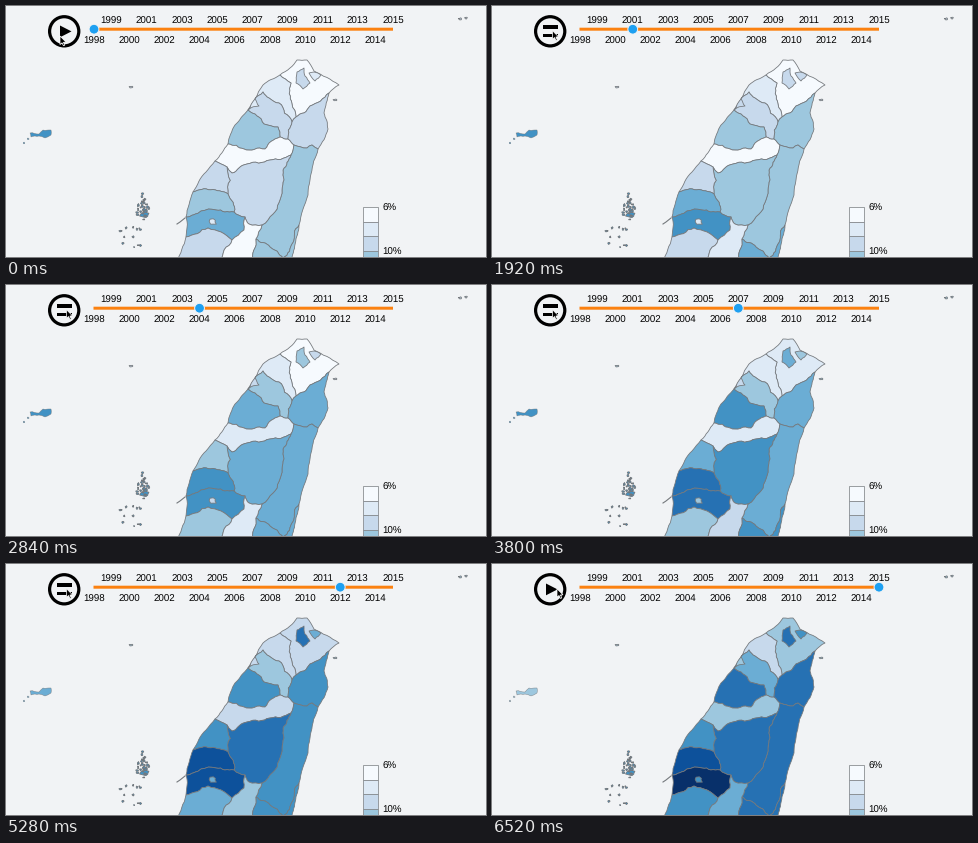
A matplotlib script for the animation above (6.56 s loop, 480 px wide and 251 px high).

```python
import numpy as np
import matplotlib.pyplot as plt
from matplotlib.animation import FuncAnimation
from matplotlib.patches import Circle, Polygon, Rectangle

W, H, DPI = 480, 251, 72          # at 72 dpi one point is one pixel
STEP, LOOP = 40, 6560
START, TICK = 920, 300            # playback start and time per year, ms
FIRST, LAST = 1998, 2015
BLUES = ["#f6fafe", "#deeaf6", "#c7d9ec", "#9dc7de", "#6badd4",
         "#4292c4", "#2671b3", "#0d519b", "#08306a"]
BG, EDGE = "#f1f3f5", "#74787c"

plt.rcParams["text.hinting"] = "none"
rng = np.random.default_rng(7)

fig = plt.figure(figsize=(W / DPI, H / DPI), dpi=DPI, facecolor=BG)
ax = fig.add_axes([0, 0, 1, 1])
ax.set(xlim=(0, W), ylim=(H, 0))
ax.axis("off")


def rough(points, amount=0.12):
    """Turn a polyline into a jagged border by midpoint displacement."""
    pts = [np.array(p, float) for p in points]
    while max(np.hypot(*(b - a)) for a, b in zip(pts, pts[1:])) > 4:
        out = pts[:1]
        for a, b in zip(pts, pts[1:]):
            dx, dy = b - a
            if np.hypot(dx, dy) > 4:
                out.append((a + b) / 2 + rng.uniform(-amount, amount) * np.array([-dy, dx]))
            out.append(b)
        pts = out
    return np.array(pts)


# points where borders meet
NODE = dict(
    A=(274, 69), B=(290, 111), C=(286, 116), D=(323, 87), E=(249, 93), F=(242, 104),
    G=(274, 131), H=(282, 133), I=(222, 138), J=(288, 139), K=(312, 143), L=(285, 149),
    M=(209, 155), N=(221, 161), O=(187, 186), P=(222, 188), Q=(180, 211), R=(228, 206),
    S=(239, 211), T=(256, 219), U=(226, 234), V=(180, 231), W=(250, 233), X=(293, 219),
    Y=(215, 256), Z=(171, 256), a=(248, 256), b=(285, 256))
links = {}


def link(ends, *via, amount=0.12):
    """Border between two nodes through a few key points."""
    a, b = ends
    line = rough([NODE[a], *via, NODE[b]], amount)
    links[a + b], links[b + a] = line, line[::-1]


# coast
link("AD", (284, 62), (291, 54), (301, 54), (308, 65), (333, 79), amount=0.06)
link("DK", (318, 107), (322, 123), amount=0.06)
link("KX", (305, 168), (302, 189), amount=0.05)
link("Xb", amount=0.05)
link("EA", (257, 79), amount=0.05)
link("FE", amount=0.05)
link("IF", (229, 119), amount=0.05)
link("MI", amount=0.05)
link("OM", (200, 166), amount=0.05)
link("QO", amount=0.06)
link("VQ", amount=0.06)
link("ZV", amount=0.06)

# inner borders that bend
link("AB", (285, 77), (286, 98))
link("BD", (304, 100))
link("EC", (257, 86), (263, 92), (273, 97))
link("FG", (251, 110), (258, 118), (272, 121))
link("IG", (238, 143), (259, 143))
link("JK", (301, 142), (306, 139))
link("NL", (226, 167), (241, 158), (264, 154))
link("LT", (277, 164), (276, 184), (267, 208))
link("QR", (195, 205), (210, 204))
link("ST", (243, 218))
link("SU", (238, 224))
link("VU", (202, 222), (215, 226))
link("WX", (264, 241), (277, 252))


def area(nodes):
    ring = zip(nodes, nodes[1:] + nodes[0])
    parts = []
    for ends in map("".join, ring):
        if ends not in links:
            link(ends)
        parts.append(links[ends])
    return np.vstack(parts)


def blob(x, y, rx, ry, n=9):
    a = np.linspace(0, 2 * np.pi, n, endpoint=False)
    r = rng.uniform(0.5, 1.2, n)
    return np.c_[x + rx * r * np.cos(a), y + ry * r * np.sin(a)]


regions = []


def region(shape, first, last, bend=1, lw=0.8):
    """Add a shape whose colour class runs from first to last over the years."""
    patch = ax.add_patch(Polygon(shape, ec=EDGE, lw=lw, joinstyle="round"))
    regions.append((patch, first, last, bend))


# mainland, north to south
region(area("ADB"), 0, 3, 2)
region(area("EABC"), 1, 1.9, 2)
region(area("FECHG"), 2.1, 3.55)
region(area("IFG"), 2.95, 5.9)
region(area("MIGHJLN"), 0, 2.55)
region(area("BDKJHC"), 2.4, 5.55)
region(area("JKXWTL"), 3, 5.5, 1.5)
region(area("NLTSRP"), 2.4, 6.4)
region(area("OMNP"), 1.8, 5.3)
region(area("QOPR"), 3.45, 7.45)
region(area("VQRSU"), 4, 8.2)
region(area("ZVUY"), 2, 4.6)
region(area("USTWaY"), 0.3, 3.6)
region(area("WXba"), 3.4, 5.55)

# cities
region(rough([(291, 66), (298, 62), (299, 70), (304, 77), (297, 83), (290, 77),
              (291, 66)]), 1.6, 6.4)
region(rough([(303, 67), (308, 66), (315, 69), (309, 75), (303, 67)]), 1, 4.52)
region(rough([(242, 104), (249, 93), (253, 100), (242, 104)]), 1.4, 2.6)
region(blob(206.5, 216, 4.5, 3), 0.6, 5)

# islands
region(rough([(25, 131), (24, 127), (33, 128), (37, 124), (45, 124), (45, 129),
              (39, 132), (33, 130), (25, 131)]), 5.2, 3, 3, lw=0.4)
for x, y in [(18, 137), (22, 133)]:
    region(blob(x, y, 1, 1), 5.2, 3, 3, lw=0.4)
region(blob(139, 209, 5, 2.6), 5, 5)
for x, y in rng.normal((137, 203), (3.6, 6), (34, 2)):
    region(blob(x, y, *rng.uniform(0.6, 1.7, 2)), 5, 5)
for x, y in rng.uniform((114, 219), (135, 242), (13, 2)):
    region(blob(x, y, *rng.uniform(0.5, 1.3, 2)), 5, 5)
for x, y in [(125, 81), (454, 13), (460, 12), (329, 94)]:
    region(blob(x, y, 1.7, 1), 2, 3)
ax.plot([171, 174, 179], [218, 216, 212], color=EDGE, lw=1.1)


def label(x, y, text, ha="center"):
    ax.text(x, y, text, ha=ha, va="baseline", fontsize=9.7, color="black",
            family="Liberation Sans")


# legend
for k in range(4):
    ax.add_patch(Rectangle((357, 201 + 14.7 * k), 15, 14.7,
                           fc=BLUES[k], ec="#85898d", lw=0.8))
label(376.4, 205.2, "6%", "left")
label(376.4, 249.2, "10%", "left")


# timeline
def year_x(year):
    return 88 + (year - FIRST) * 299 / (LAST - FIRST)


ax.plot([87.5, 387], [23.2, 23.2], color="#fb8110", lw=3, solid_capstyle="butt",
        snap=False, zorder=3)
for year in range(FIRST, LAST + 1):
    label(year_x(year), 17.6 if year % 2 else 37.6, str(year))
knob = ax.add_patch(Circle((88, 23.2), 4.9, fc="#1ea0f1", ec=BG, lw=1, zorder=4))

# play button
ax.add_patch(Circle((58.2, 25.3), 14.6, fc=BG, ec="black", lw=3.2, zorder=3))
play = ax.add_patch(Polygon([(54, 19.5), (54, 31.3), (65.5, 25.4)], fc="black", zorder=4))
pause = [ax.add_patch(Rectangle((51, y), 15, 3.2, fc="black", zorder=4))
         for y in (19.4, 28)]

ARROW = np.array([(0, 0), (0, 8.6), (2, 6.8), (3.5, 9.8), (4.8, 9.2), (3.4, 6.3), (6, 6.1)])
cursor = ax.add_patch(Polygon(ARROW, fc="black", ec="white", lw=0.7, zorder=6))


def ease(t, a, b):
    u = np.clip((t - a) / (b - a), 0, 1)
    return u * u * (3 - 2 * u)


def draw(i):
    t = i * STEP
    year = int(np.clip(FIRST + (t - START) // TICK, FIRST, LAST))
    playing = START <= t < START + TICK * (LAST - FIRST + 1)
    s = (year - FIRST) / (LAST - FIRST)

    for patch, first, last, bend in regions:
        patch.set_facecolor(BLUES[int(first + (last - first) * s ** bend + 0.5)])
    knob.center = (year_x(year), 23.2)
    play.set_visible(not playing)
    for bar in pause:
        bar.set_visible(playing)

    x = 54 + 6.5 * ease(t, 200, 800) + 4.5 * ease(t, 6200, 6480)
    y = 30 - 5.3 * ease(t, 200, 800)
    cursor.set_xy(ARROW + (x, y))


anim = FuncAnimation(fig, draw, frames=LOOP // STEP, interval=STEP,
                     repeat=True, repeat_delay=0, blit=False)
plt.show()
```
